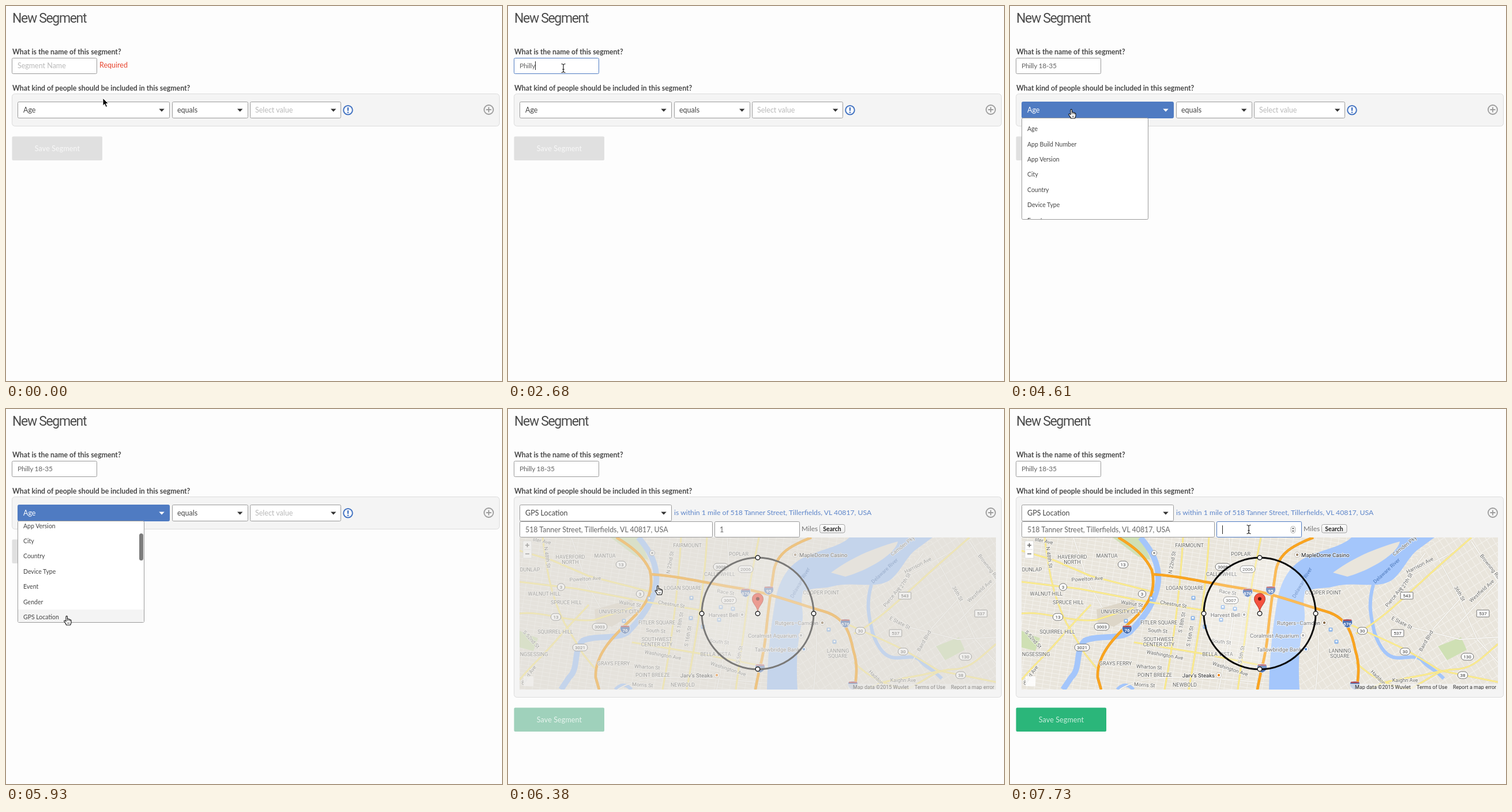
Recreate the animation shown at these times as an HTML page. Size 860 px wide and 651 px high, loop 8 s.

```html
<!DOCTYPE html>
<html lang="en">
<head>
<meta charset="utf-8">
<title>New Segment</title>
<style>
html, body { margin: 0; width: 100%; height: 100%; overflow: hidden; background: #fdfdfd; }
svg { display: block; width: 860px; height: 651px; }
text { font-family: Lato, sans-serif; font-size: 12.5px; fill: #444; white-space: pre; }
.title { font: 400 23px Roboto, sans-serif; letter-spacing: -1.35px; fill: #4c4c4c; }
.label { font-size: 12.3px; font-weight: 700; fill: #484848; }
.hint { fill: #b9b9b9; }
.typed { font-size: 12px; letter-spacing: -.25px; fill: #666; }
.addr { font-size: 12.4px; fill: #666; }
.link { font-size: 12.25px; fill: #5e86ca; }
.item { font-size: 10.5px; }
.map text { font: 9px Roboto, sans-serif; fill: #666662; text-anchor: middle;
  stroke: #fff; stroke-opacity: .75; stroke-width: 2; stroke-linejoin: round; paint-order: stroke; }
.map .river { fill: #4c78ba; stroke: none; }
.map .poi { font-size: 9.6px; fill: #444; }
.map .dark { fill: #222; }
.map .start { text-anchor: start; }
.map .end { text-anchor: end; }
.map .sign { font-size: 8px; fill: #333; stroke: none; }
.map .blue { fill: #fff; font-weight: 700; }
.map .legal { font-size: 9px; fill: #333; stroke: none; text-anchor: start; }
</style>
</head>
<body>
<svg id="stage" viewBox="0 0 860 651"></svg>
<script>
const LOOP = 8000, TICK = 148.6, LEAD = 14.5;
const BLUE = '#4f7bc2', GREY = '#9a9a9a';
const CITY = '518 Tanner Street, Tillerfields, VL';
const ADDRESS = CITY + ' 40817, USA';
const ITEMS = ['Age', 'App Build Number', 'App Version', 'City', 'Country',
  'Device Type', 'Event', 'Gender', 'GPS Location'];
const ROW = 26.4;

const text = (s, x, y, cls = '', more = '') =>
  `<text x="${x}" y="${y}" class="${cls}" ${more}>${s}</text>`;
const rect = (x, y, w, h, fill, more = '') =>
  `<rect x="${x}" y="${y}" width="${w}" height="${h}" fill="${fill}" ${more}/>`;
const dot = (x, y, r, fill, more = '') =>
  `<circle cx="${x}" cy="${y}" r="${r}" fill="${fill}" ${more}/>`;
const path = (d, fill, more = '') => `<path d="${d}" fill="${fill}" ${more}/>`;
const line = (d, color, w, more = '') =>
  path(d, 'none', `stroke="${color}" stroke-width="${w}" stroke-linejoin="round" ${more}`);
const group = (id, body, more = '') => `<g id="${id}" ${more}>${body}</g>`;
const box = (x, y, w, h, id = '') =>
  rect(x, y, w, h, '#fff', `rx="2" stroke="${GREY}" id="${id}"`);
const caret = (x, y, id = '') => path(`M${x - 4.7} ${y}h9.4l-4.7 5z`, '#333', `id="${id}"`);

// Map
const DISTRICTS = [
  ['HAVERFORD', 108, 260], ['NORTH', 108, 269], ['MANTUA', 168, 258], ['DUNLAP', 38, 282],
  ['WALNUT HILL', 63, 324], ['SPRUCE HILL', 101, 339], ['UNIVERSITY CITY', 193, 355],
  ['SQUIRREL HILL', 82, 390], ['FAIRMOUNT', 311, 240], ['POPLAR', 400, 255],
  ['CALLOWHILL', 367, 290], ['LOGAN SQUARE', 303, 314], ['FITLER SQUARE', 258, 374],
  ['SOUTHWEST', 258, 403], ['CENTER CITY', 258, 412], ['NGSESSING', 45, 429],
  ['GRAYS FERRY', 183, 445], ['POINT BREEZE', 251, 465], ['NEWBOLD', 303, 482],
  ['BELLA VISTA', 360, 429], ['COOPER POINT', 543, 322], ['LANNING', 572, 423],
  ['SQUARE', 572, 432]];
const STREETS = [
  ['N 48th St', 65, 258, 82], ['N 22nd St', 284, 267, -80], ['Powelton Ave', 134, 298, -3],
  ['Walnut St', 211, 341, 9], ['Chestnut St', 283, 342, 9], ['Race St', 377, 321, 9],
  ['South St', 256, 388, 4], ['South St', 366, 407, 6], ['S 18th St', 301, 371, -80],
  ['S 16th St', 315, 395, -80], ['S 5th St', 404, 427, -80], ['Washington Ave', 268, 430, 10],
  ['Washington Ave', 381, 454, 18], ['Wharton St', 241, 451, 4], ['Morris St', 233, 482, 4],
  ['S 52nd St', 38, 402, 48], ['dland Ave', 38, 464, -55], ['ster Ave', 58, 232, 12],
  ['Harrison Ave', 712, 274, -28], ['N 27th St', 689, 303, -60], ['Pierce Ave', 668, 328, -52],
  ['36th St', 777, 322, 60], ['Westfield Ave', 820, 318, -42], ['Browning Rd', 830, 275, 52],
  ['E State St', 678, 374, 27], ['Baird Blvd', 724, 404, -60], ['Haddon', 636, 468, 45],
  ['Kaighn Ave', 685, 474, 0], ['Camden Pky', 686, 240, -38]];
const OVALS = [[13, 196, 270], [3, 92, 309], [3, 229, 321], [13, 83, 361], [3003, 159, 378],
  [3021, 125, 414], [3008, 369, 274], [2006, 412, 278], [3007, 383, 332], [30, 611, 385],
  [30, 685, 421], [130, 793, 430], [38, 785, 462]];
const PLATES = [[543, 688, 324], [537, 672, 389], [537, 820, 355]];
const SHIELDS = [[76, 203, 383], [676, 412, 319], [95, 452, 315], [676, 585, 372],
  ['', 437, 450], ['', 598, 480]];
const STOPS = [[318, 328], [317, 363], [201, 368], [369, 344], [366, 366], [390, 347],
  [338, 378], [556, 383], [566, 404], [245, 329]];

const grid = (id, w, h, a) => `<pattern id="${id}" width="${w}" height="${h}"
  patternUnits="userSpaceOnUse" patternTransform="rotate(${a})">
  <path d="M0 0H${w}M0 0V${h}" stroke="#fff" stroke-width="1.4" opacity=".65"/></pattern>`;

const YELLOW = [
  'M20 246L75 262L140 290L250 318', 'M20 355C60 350 110 372 150 366L215 345',
  'M60 223C66 270 72 320 98 372L130 425L150 450', 'M20 300L120 312L240 335L340 350',
  'M20 470C45 440 70 420 95 388L140 340', 'M300 223C296 300 285 400 268 487',
  'M345 223C340 320 322 420 310 487', 'M215 405L330 424L440 446',
  'M435 223L420 300L407 400L395 487',
  'M585 372C615 386 655 402 690 420L746 454L846 474', 'M600 390C640 372 700 310 760 258L800 223',
  'M690 487C725 472 740 452 770 452S815 435 846 408', 'M600 440C630 470 660 480 690 487',
  'M625 487C640 470 690 470 746 455'];
const STREET_LINES = [
  'M110 223L135 300L160 345', 'M190 487C230 460 300 462 440 475', 'M380 223C384 300 392 330 384 380L362 487',
  'M530 487C535 440 538 390 530 345', 'M650 345L700 380L780 400L846 396',
  'M735 245L775 320L810 400L846 440', 'M650 350L690 290L720 250', 'M690 290L760 252',
  'M780 370L846 300', 'M800 230L846 300', 'M700 440L735 380L780 330'];
const ORANGE = [
  'M188 223C213 238 234 254 246 280C255 320 236 344 214 365C185 392 150 425 152 466L158 487',
  'M247 287C300 290 350 304 400 311S495 336 550 352C588 364 594 395 599 420C607 445 604 465 601 487',
  'M526 223C490 237 467 250 461 280C455 320 451 350 447 390C444 430 435 450 429 487'];
const RIVER = 'M736 223H592C574 241 530 246 505 262C482 277 470 300 464 330C455 380 450 430 449 487' +
  'H502C499 440 502 400 510 370C514 352 505 335 512 318C530 308 545 313 562 308' +
  'C600 298 640 315 665 295C682 280 690 258 706 245Z';
const CAMDEN = 'M503 487L512 318L665 295L740 223H846V487Z';

const ground = rect(20, 223, 826, 264, '#e9e5dc') + rect(20, 223, 826, 264, 'url(#west)') +
  path(CAMDEN, '#e9e5dc') + path(CAMDEN, 'url(#east)') +
  path('M178 223H228L244 262L222 256ZM20 385L52 398L44 420L20 414ZM742 412L782 396L792 418L758 436Z', '#cfe0b4') +
  path('M150 348L215 330L222 352L180 378L152 370Z', '#ddd6c8') +
  path(RIVER, '#a4c6fb') +
  path('M560 284C590 262 625 244 676 230C672 252 624 280 585 291Z', '#e9e5dc') +
  line('M226 223C248 248 259 272 257 300C252 340 227 367 208 387C190 401 150 392 130 402C112 418 124 450 106 466L92 487', '#a4c6fb', 10) +
  line('M186 487C196 476 206 478 214 487M630 305C620 340 626 362 632 388C640 412 652 432 672 432S706 426 716 438S735 450 752 468', '#a4c6fb', 6);

const roads = STREET_LINES.map(d => line(d, '#d4cfc2', 2.4) + line(d, '#fff', 1.4)).join('') +
  YELLOW.map(d => line(d, '#e8d68a', 3) + line(d, '#fdee8e', 2)).join('') +
  ORANGE.map(d => line(d, '#e8971e', 4.6) + line(d, '#fba51f', 3.4)).join('');

const turned = (s, x, y, a, cls) => text(s, x, y, cls, `transform="rotate(${a} ${x} ${y})"`);
const poi = (s, x, y, side, color, dark = '') => {
  const dx = side === 'start' ? 7 : -7;
  return dot(x, y, 4.6, '#fff', 'stroke="#b5b0a6" stroke-width=".8"') + dot(x, y, 2.2, color) +
    text(s, x + dx, y + 3.6, `poi ${side} ${dark}`);
};
const frame = (s, x, y, rx) => {
  const w = 9 + 4.2 * String(s).length;
  return rect(x - w / 2, y - 6, w, 12, '#fff', `rx="${rx}" stroke="#666" stroke-width=".9"`) +
    text(s, x, y + 3, 'sign');
};
const shield = (s, x, y) =>
  path(`M${x - 8} ${y - 6}Q${x} ${y - 9} ${x + 8} ${y - 6}Q${x + 11} ${y + 4} ${x} ${y + 8}Q${x - 11} ${y + 4} ${x - 8} ${y - 6}Z`,
    '#4a72b4', 'stroke="#fff" stroke-width=".8"') +
  rect(x - 7, y - 6.5, 14, 2, '#c8433c') + text(s, x, y + 4, 'sign blue');

const labels = STOPS.map(([x, y]) =>
    rect(x - 3.5, y - 3.5, 7, 7, '#8db6ea', 'rx="1.5"') + rect(x - 1.5, y - 2, 3, 3, '#fff')).join('') +
  DISTRICTS.map(d => text(...d)).join('') + STREETS.map(d => turned(...d)).join('') +
  turned('Delaware River', 509, 303, -60, 'river') + turned('Delaware River', 655, 283, -43, 'river') +
  OVALS.map(d => frame(...d, 6)).join('') + PLATES.map(d => frame(...d, 1)).join('') +
  SHIELDS.map(d => shield(...d)).join('') +
  poi('MapleDome Casino', 498, 253, 'start', '#a08a70', 'dark') +
  poi('Harvest Bell', 406, 357, 'end', '#999') +
  poi('Rutgers–Camden', 545, 371, 'end', '#8a6d4a') +
  poi('Coralmist Aquarium', 508, 393, 'end', '#999') +
  poi('Tallowbridge Bank', 513, 417, 'end', '#5b8fd6') +
  poi('Jarv’s Steaks', 362, 462, 'end', '#f08a24', 'dark') +
  dot(250, 250, 4.6, '#fff', 'stroke="#999"') + dot(250, 250, 2, '#999');

const controls = rect(26, 229, 15, 30, '#fff', 'rx="1" stroke="#ccc" stroke-width=".6"') +
  line('M28 244H39', '#ddd', 1) + line('M30 236.5h7M33.5 233v7M30 251.5h7', '#666', 1.6) +
  rect(27, 464, 17, 17, '#fff', 'opacity=".85"') +
  rect(590, 477, 256, 10, '#f5f5f5', 'opacity=".75"') +
  text('Map data ©2015 Wuvlet', 598, 485.5, 'legal') + text('Terms of Use', 705, 485.5, 'legal') +
  text('Report a map error', 768, 485.5, 'legal');

const ring = dot(433, 355, 97, '#fff', 'fill-opacity=".25" stroke="#0a0a0a" stroke-width="3"') +
  path('M433 352C432 342 423.5 338 423.5 329.5A9.5 9.5 0 0 1 442.5 329.5C442.5 338 434 342 433 352Z',
    '#f4513f', 'stroke="#b23a2c"') + dot(433, 329.5, 3.1, '#5f130c');
const handles = [[433, 258], [336, 355], [433, 355], [530, 355], [433, 451.5]]
  .map(([x, y]) => dot(x, y, 3.8, '#fff', 'stroke="#222" stroke-width="1.4"')).join('');

// Form
const warn = dot(0, 0, 7.8, '#fdfdfd', 'stroke="#4474c2" stroke-width="2"') +
  line('M0 -4.8V1.2M0 2.8V5', '#4474c2', 2.4);

const header = text('New Segment', 11, 28.5, 'title') +
  text('What is the name of this segment?', 11, 84, 'label') +
  box(10.5, 90.5, 147, 27, 'nameBox') + text('', 20, 108, 'typed', 'id="name"') +
  text('Segment Name', 20, 108, 'hint', 'id="nameHint"') +
  line('M0 96V111', '#222', 1, 'id="nameCaret"') +
  text('Required', 162, 107, '', 'id="required" style="fill:#e8452f"') +
  text('What kind of people should be included in this segment?', 11, 147, 'label');

const plain = box(288.5, 166.5, 131, 28) + text('equals', 297, 185) + caret(405.7, 178.5) +
  box(423.5, 166.5, 157, 28) + text('Select value', 432, 185, 'hint') + caret(567.7, 178.5);

const located = text('', 288, 184, 'link', 'id="link"') +
  box(20.5, 195.5, 334, 27) + text(ADDRESS, 30, 213.5, 'addr', 'id="addr"') +
  box(358.5, 195.5, 147, 27, 'mileBox') + text('1', 367, 213.5, 'addr', 'id="mile"') +
  line('M0 202V217', '#222', 1, 'id="mileCaret"') +
  group('spin', rect(487, 203.5, 7.5, 12, '#f8f8f8', 'rx="3.5" stroke="#aaa" stroke-width=".9"') +
    path('M489 208.3l1.8 -2.6l1.8 2.6zM489 211l1.8 2.6l1.8 -2.6z', '#444')) +
  text('Miles', 509, 212, '', 'style="font-size:12px;fill:#777"') +
  rect(540.5, 200.5, 43.5, 14.5, 'url(#btn)', 'rx="3" stroke="#a5a5a5"') +
  text('Search', 562, 211.7, '', 'text-anchor="middle" style="font-size:10.5px;font-weight:700;fill:#222"') +
  rect(20, 223, 826, 264, '#e3e1dd') +
  group('tiles', ground + roads + labels + controls + ring, 'class="map" clip-path="url(#mapClip)"') + handles;

const list = rect(20.5, 194.5, 219, 176, '#fff', `rx="2" stroke="${GREY}"`) +
  `<g clip-path="url(#listClip)">` + rect(21, 0, 218, ROW, '#f4f4f4', 'id="hover"') +
  group('items', ITEMS.map((s, i) => text(s, 30, 217.2 + i * ROW, 'item')).join('')) +
  rect(231, 0, 7, 47, '#7c7c7c', 'rx="3.5" id="thumb"') + '</g>';

const outline = 'stroke="#fff" stroke-width="1" stroke-linejoin="round"';
const ink = 'stroke="#111" stroke-width="1.1" stroke-linejoin="round"';
const BEAM = 'M-3.5 -7.5Q0 -7.5 0 -5V5Q0 7.5 -3.5 7.5M3.5 -7.5Q0 -7.5 0 -5V5Q0 7.5 3.5 7.5M-1.8 2H1.8';
const cursors =
  group('arrow', path('M0 0V13.2L3 10.4L5.2 15.4L7.6 14.4L5.4 9.6H9.6Z', '#000', outline)) +
  group('beam', line(BEAM, '#fff', 2.4, 'opacity=".7"') + line(BEAM, '#111', 1.1)) +
  group('hand', path('M-3 1V-6Q-3 -7.6 -1.8 -7.6T-.5 -6V-2.4Q1 -3.4 2 -1.8Q3.4 -2.6 4.2 -.9Q6 -1.4 6 .6V3.4Q5.8 5.6 4.6 8H-2.4Q-3.4 5 -5.8 2.4Q-7 .6 -5.4 .2Q-4.2 0 -3 1.8Z', '#fff', ink) +
    line('M-.5 -2.4V1M2 -1.6V1M4.2 -.8V1.4M.2 3.5V6M2.3 3.5V6', '#111', .8)) +
  group('grab', path('M-3.6 1.4L-5 -3.6Q-5 -5.4 -3.4 -5L-2 -2V-6Q-1.2 -7.8 0 -6.2Q1 -8 2.2 -6L2.4 -4.8Q4 -6 4.6 -4.2L4.6 -2.4Q6.6 -3.2 6.6 -1.2L5.4 4.4L4.4 7H-2.2L-6.2 2Q-6.8 .2 -5 .2Z', '#fff', ink) +
    line('M-2 -2.4L-1.2 .6M.1 -6V0M2.4 -5L2 .4M4.6 -3L3.9 .8', '#111', .9));

const stage = document.getElementById('stage');
stage.innerHTML = '<defs>' + grid('west', 13, 7, 9) + grid('east', 10, 14, -32) +
  `<linearGradient id="btn" x2="0" y2="1"><stop stop-color="#fff"/><stop offset="1" stop-color="#ececec"/></linearGradient>
  <clipPath id="mapClip"><rect x="20" y="223" width="826" height="264"/></clipPath>
  <clipPath id="listClip"><rect x="21" y="195.5" width="218" height="174.5"/></clipPath></defs>` +
  rect(0, 0, 860, 651, '#fdfdfd') + header +
  rect(10.5, 152.5, 845, 56, '#f4f4f4', 'id="panel" rx="5" stroke="#dcdcdc"') +
  group('save', rect(10.5, 226.5, 156.5, 41.5, '', 'rx="2" id="saveBox"') +
    text('Save Segment', 89, 251.5, '', 'text-anchor="middle" style="fill:#fff;letter-spacing:.12px" opacity=".75"')) +
  group('plain', plain) + group('located', located) + group('warn', warn) +
  dot(837, 180, 8, 'none', 'stroke="#9c9c9c" stroke-width="1.8"') +
  line('M832.5 180h9M837 175.5v9', '#9c9c9c', 1.8) +
  box(20.5, 166.5, 263, 28, 'fieldBox') + text('Age', 30, 185, '', 'id="field"') + caret(270, 178.5, 'fieldCaret') +
  group('list', list) + group('cursor', cursors);

const el = {};
stage.querySelectorAll('[id]').forEach(n => el[n.id] = n);
const set = (id, attrs) => { for (const a in attrs) el[id].setAttribute(a, attrs[a]); };
const show = (id, on) => { el[id].style.display = on ? '' : 'none'; };
const clamp = v => Math.max(0, Math.min(1, v));

// Keys are [tick, ...values], joined by straight lines
const track = (keys, k) => {
  let i = 0;
  while (i < keys.length - 2 && k >= keys[i + 1][0]) i++;
  const [a, b] = [keys[i], keys[i + 1]];
  const p = clamp((k - a[0]) / (b[0] - a[0]));
  return a.slice(1).map((v, j) => v + (b[j + 1] - v) * p);
};
const MOVES = [[0, 168, 160], [3, 117, 115], [4, 117, 115], [7, 96, 108], [26, 96, 108],
  [27, 98, 119], [30, 108, 187], [31, 108, 187], [34, 107, 270], [37, 107, 352],
  [40, 107, 367], [41, 107, 367], [42, 105, 360], [44, 418, 269], [47, 415, 214], [48, 414, 209]];
const SCROLL = [[36, 0], [37, 10], [38, 34], [40, 63.3]];
const TYPED = [[10, 1], [13, 2], [14, 4], [16, 5], [18, 6], [19, 7], [21, 8], [22, 9], [24, 11], [25, 12]];
const SHAPES = [[0, 'arrow'], [2, 'beam'], [28, 'arrow'], [29, 'hand'], [42, 'grab'], [43, 'hand'], [47, 'beam']];
const last = (keys, k, none) => keys.reduce((v, [at, x]) => k >= at ? x : v, none);

function draw(t) {
  const k = Math.floor((t + LEAD) / TICK);
  const [x, y] = track(MOVES, k);
  const [scroll] = track(SCROLL, k);

  const count = last(TYPED, k, 0);
  const naming = k >= 7 && k < 30;
  el.name.textContent = 'Philly 18-35'.slice(0, count);
  show('nameHint', !count);
  show('required', !count);
  show('nameCaret', naming);
  const end = count ? el.name.getComputedTextLength() : 0;
  set('nameCaret', { transform: `translate(${Math.round(20 + end) + .5} 0)` });
  set('nameBox', { stroke: naming ? BLUE : GREY });

  const open = k >= 30 && k < 43, gps = k >= 42, loaded = k >= 43;
  set('fieldBox', { fill: open ? BLUE : '#fff', stroke: open ? BLUE : GREY });
  el.field.textContent = gps ? 'GPS Location' : 'Age';
  el.field.style.fill = open ? '#fff' : '';
  set('fieldCaret', { fill: open ? '#fff' : '#333' });
  show('list', open);
  set('items', { transform: `translate(0 ${-scroll})` });
  const row = Math.floor((y - 200.2 + scroll) / ROW);
  show('hover', y > 200);
  set('hover', { y: 200.2 + row * ROW - scroll });
  show('thumb', scroll > 0 && !gps);
  set('thumb', { y: 199 + scroll * .27 });

  show('plain', !gps);
  show('located', gps);
  show('warn', !loaded);
  set('warn', { transform: `translate(${gps ? 577.5 : 593} 180.7)` });
  set('panel', { height: gps ? 348 : 56 });
  set('save', { transform: `translate(0 ${gps ? 292 : 0})` });
  const mix = clamp((k - 42) * .36);
  const shade = [[224, 43], [224, 182], [224, 122]].map(([a, b]) => Math.round(a + (b - a) * mix));
  set('saveBox', { fill: `rgb(${shade})` });

  el.link.textContent = 'is within 1 mile of ' + (loaded ? ADDRESS : CITY);
  show('addr', loaded);
  set('tiles', { opacity: clamp((k - 42) * .48) });
  const miles = k >= 49, cleared = k >= 52;
  set('mileBox', { stroke: miles ? BLUE : GREY });
  show('mile', !cleared);
  show('spin', miles);
  show('mileCaret', miles);
  set('mileCaret', { transform: `translate(${cleared ? 368.5 : 373.5} 0)` });

  const shape = last(SHAPES, k, 'arrow');
  for (const s of ['arrow', 'beam', 'hand', 'grab']) show(s, s === shape);
  set('cursor', { transform: `translate(${x} ${y})` });
}

function loop() {
  draw(performance.now() % LOOP);
  requestAnimationFrame(loop);
}
loop();
</script>
</body>
</html>
```
